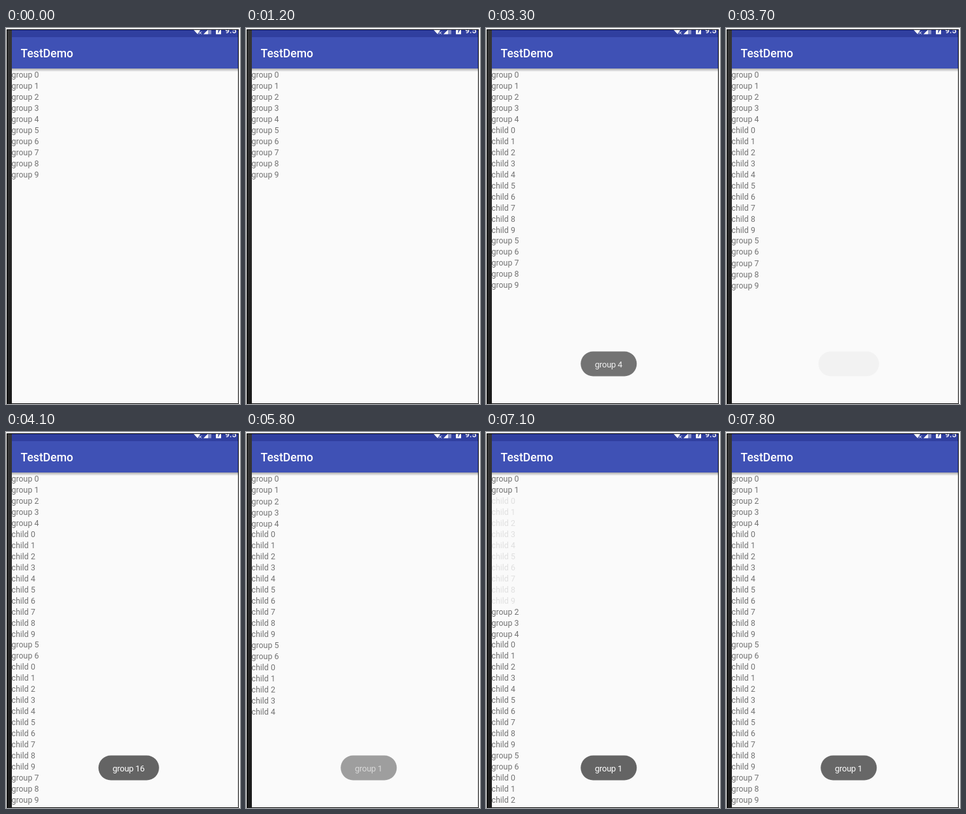
Write an HTML page with a canvas that moves like this. It is 359x576 px and loops after 8000 ms.

```html
<!DOCTYPE html>
<html lang="en">
<head>
<meta charset="utf-8">
<title>Expandable list</title>
<style>
  html, body { margin: 0; width: 100%; height: 100%; overflow: hidden; background: #fff; }
  canvas { display: block; }
</style>
</head>
<body>
<canvas id="stage" width="359" height="576"></canvas>
<script>
const ctx = document.getElementById('stage').getContext('2d');
const LOOP = 8000, TICK = 100, LAST_CHANGE = 7800;
const MOVE = 250, FADE = 120, TOAST_FADE = 400;
const PITCH = 16.966, LAST_ROW = 31;

// Each tap toggles one group; lag is the pause before rows move.
const taps = [
  { at: 1485, group: 4, lag: 0 },
  { at: 3690, group: 6, lag: 0 },
  { at: 5690, group: 1, lag: 100 },
  { at: 7015, group: 1, lag: 0 }
];
const toasts = [
  { text: 'group 4', from: 1484, to: 3170, half: 43 },
  { text: 'group 16', from: 3690, to: 5376, half: 46.5 },
  { text: 'group 1', from: 5650, to: 7740, half: 43 }
];

const clamp = x => Math.max(0, Math.min(1, x));
const ease = x => 0.5 - Math.cos(Math.PI * clamp(x)) / 2;
const font = (size, weight = 400) => `${weight} ${size}px Roboto, sans-serif`;

function rect(color, x, y, w, h) {
  ctx.fillStyle = color;
  ctx.fillRect(x, y, w, h);
}

function shape(color, ...points) {
  ctx.fillStyle = color;
  ctx.beginPath();
  points.forEach(p => ctx.lineTo(...p));
  ctx.fill();
}

function gradient(y0, y1, from, to) {
  const g = ctx.createLinearGradient(0, y0, 0, y1);
  g.addColorStop(0, from);
  g.addColorStop(1, to);
  return g;
}

function text(str, x, y, color, face) {
  ctx.font = face;
  ctx.fillStyle = color;
  ctx.fillText(str, x, y);
}

// Maps every visible item to its row; children are keyed by group and index.
function layout(open) {
  const rows = new Map();
  for (let g = 0; g < 10; g++) {
    rows.set(`group ${g}`, rows.size);
    if (open.has(g)) {
      for (let c = 0; c < 10; c++) rows.set(`child ${c}/${g}`, rows.size);
    }
  }
  return rows;
}

function drawRow(key, row, alpha = 1) {
  ctx.globalAlpha = alpha;
  text(key.split('/')[0], 8.5, Math.round(76 + PITCH * row), '#737373', font(12.4));
  ctx.globalAlpha = 1;
}

function drawList(t) {
  const open = new Set();
  let before = layout(open), after = before, tap = null, expanding = false;
  for (const next of taps) {
    if (t < next.at) break;
    tap = next;
    before = layout(open);
    expanding = !open.delete(tap.group);
    if (expanding) open.add(tap.group);
    after = layout(open);
  }
  const age = tap ? t - tap.at - tap.lag : 0;
  const moved = ease((expanding ? age : age - FADE) / MOVE);
  const faded = ease((expanding ? age - MOVE : age) / FADE);

  for (const [key, row] of after) {
    if (!before.has(key)) drawRow(key, row, faded);
    else if (!expanding || row <= LAST_ROW) {
      const start = before.get(key);
      drawRow(key, start + (row - start) * moved);
    }
  }
  for (const [key, row] of before) {
    if (!after.has(key)) drawRow(key, row, 1 - faded);
  }
}

function drawToast({ text: label, from, to, half }, t) {
  if (t < from || t > to + TOAST_FADE) return;
  const enter = 1 - (1 - clamp((t - from) / TOAST_FADE)) ** 2;
  const leave = 1 - clamp((t - to) / TOAST_FADE) ** 2;
  ctx.globalAlpha = enter * leave;
  ctx.fillStyle = '#646464';
  ctx.beginPath();
  ctx.roundRect(188.3 - half, 495.5, half * 2, 38, 19);
  ctx.fill();
  ctx.textAlign = 'center';
  ctx.letterSpacing = '-0.3px';
  text(label, 188, 520, '#fff', font(13));
  ctx.letterSpacing = '0px';
  ctx.textAlign = 'left';
  ctx.globalAlpha = 1;
}

function drawBars() {
  rect(gradient(62, 67, 'rgba(0,0,0,.32)', 'rgba(0,0,0,0)'), 9, 62, 347, 5);
  rect('#303f9f', 9, 3, 347, 11);
  rect('#3f51b5', 9, 14, 347, 48);
  text('TestDemo', 22.5, 45, '#fff', font(17.6, 500));

  // Status icons, cut off by the top edge
  shape('#fff', [288, 3], [298, 3], [294, 9.5]);
  ctx.strokeStyle = '#fff';
  ctx.beginPath();
  ctx.moveTo(296, 5.5); ctx.lineTo(300, 9.5);
  ctx.moveTo(300, 5.5); ctx.lineTo(296, 9.5);
  ctx.stroke();
  rect('#8b94cb', 310, 3, 5, 6.5);
  shape('#fff', [303, 9.5], [309.5, 3], [310, 3], [310, 9.5]);
  rect('#fff', 322, 3, 8, 6.5);
  shape('#303f9f', [326, 3], [328, 3], [326, 7.5], [325, 7.5], [325.5, 5]);
  text('9:5', 336, 8.3, '#fff', font(12.5, 500));
}

function drawFrame() {
  rect('#000', 1, 2, 356, 1);
  rect('#000', 1, 2, 1, 574);
  rect(gradient(3, 576, '#363636', '#1b1b1b'), 2, 3, 7, 573);
  rect('#000', 356, 2, 1, 574);
  rect('#000', 9, 575, 348, 1);
}

function draw(now) {
  const t = Math.min(Math.floor(now % LOOP / TICK) * TICK, LAST_CHANGE);
  rect('#fff', 0, 0, 359, 576);
  ctx.save();
  ctx.beginPath();
  ctx.rect(8, 3, 348, 572);
  ctx.clip();
  rect('#fafafa', 9, 3, 347, 572);
  drawList(t);
  drawBars();
  toasts.forEach(toast => drawToast(toast, t));
  ctx.restore();
  drawFrame();
}

const start = performance.now();
(function tick() {
  draw(performance.now() - start);
  requestAnimationFrame(tick);
})();
</script>
</body>
</html>
```
